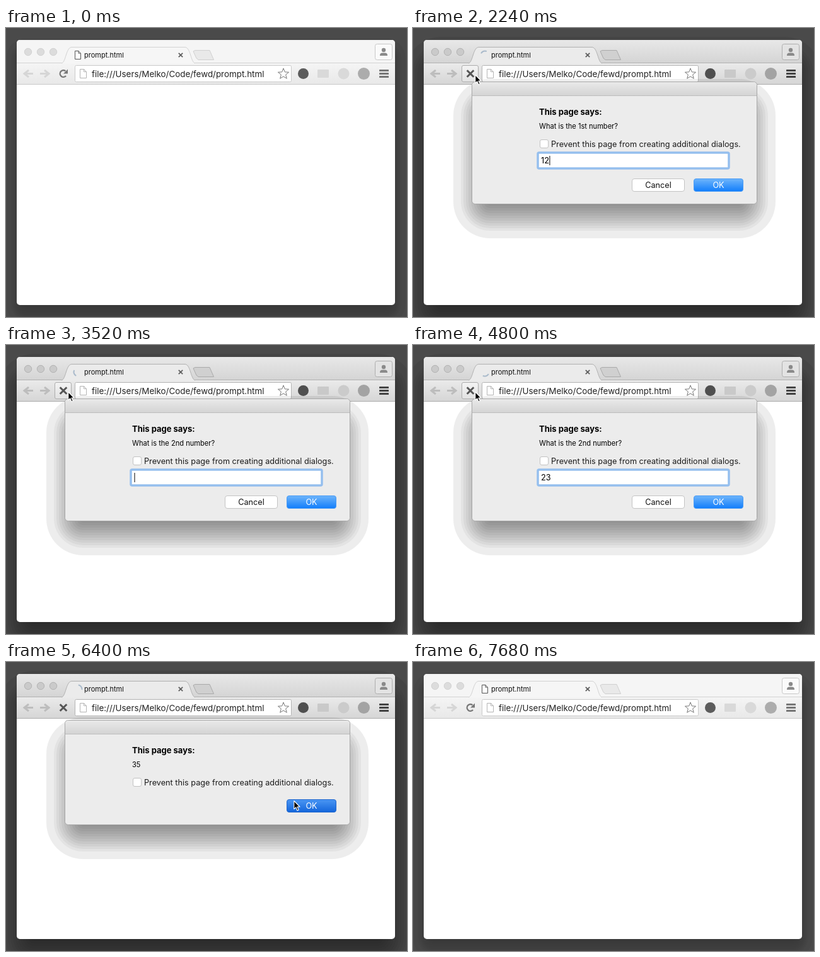
These frames come from a looping animation (636 px wide and 459 px high, 7.84 s). An HTML page with a canvas:

```html
<!DOCTYPE html>
<html lang="en">
<head>
<meta charset="utf-8">
<title>prompt.html</title>
<style>
html, body { margin: 0; width: 100%; height: 100%; overflow: hidden; background: #4a4a4a; }
canvas { display: block; width: 636px; height: 459px; }
</style>
</head>
<body>
<canvas id="stage" width="636" height="459"></canvas>
<script>
const W = 636, H = 459, LOOP = 7840, STEP = 160;
const FONT = 'Inter, "Open Sans", sans-serif';
const stage = document.getElementById('stage').getContext('2d');
const layer = document.createElement('canvas');
layer.width = W;
layer.height = H;
const sheet = layer.getContext('2d');
let g = stage;

const PROMPT = { y: 86, h: 193 }, ALERT = { y: 93, h: 165 };
const DIALOGS = [
  { from: 1182, to: 2880, box: PROMPT, text: 'What is the 1st number?', keys: '12', typeAt: 1920 },
  { from: 3010, to: 4860, box: PROMPT, text: 'What is the 2nd number?', keys: '23', typeAt: 3840 },
  { from: 4860, to: 6560, box: ALERT, text: '35' }
];
const POINTER = [
  [160, 406, 419], [320, 372, 380], [800, 98, 74], [5600, 98, 74],
  [6080, 456, 220], [6720, 456, 220], [7040, 406, 419], [7680, 406, 419]
];

function vertical(y, h, top, bottom) {
  const grad = g.createLinearGradient(0, y, 0, y + h);
  grad.addColorStop(0, top);
  grad.addColorStop(1, bottom);
  return grad;
}

function paint(fill, stroke, width = 1) {
  if (fill) { g.fillStyle = fill; g.fill(); }
  if (stroke) { g.strokeStyle = stroke; g.lineWidth = width; g.stroke(); }
}

function box(x, y, w, h, r, fill, stroke, width) {
  g.beginPath();
  g.roundRect(x, y, w, h, r);
  paint(fill, stroke, width);
}

function disc(x, y, r, fill, stroke, width) {
  g.beginPath();
  g.arc(x, y, r, 0, 7);
  paint(fill, stroke, width);
}

function poly(points, fill, stroke, width, open) {
  g.beginPath();
  points.forEach(([x, y]) => g.lineTo(x, y));
  if (!open) g.closePath();
  paint(fill, stroke, width);
}

function label(str, x, y, size, color, weight = 400, align = 'left') {
  g.font = `${weight} ${size}px ${FONT}`;
  g.textAlign = align;
  g.fillStyle = color;
  g.fillText(str, x, y);
}

function cross(x, y, r, width, color) {
  poly([[x - r, y - r], [x + r, y + r]], null, color, width, true);
  poly([[x + r, y - r], [x - r, y + r]], null, color, width, true);
}

// Stepped window shadow; k sets its reach, outer is the faint first ring.
function shadow(x, y, w, h, k, outer, first) {
  const ring = (d, alpha) => {
    const e = d * k;
    box(x - e, y + 25 * k - e, w + 2 * e, h + 2 * e, Math.max(6, (28 + d) * k), `rgba(0,0,0,${alpha})`);
  };
  ring(outer, first);
  for (let d = 18; d > -28; d -= 4) ring(Math.min(d, outer), 0.045 * k);
}

function pageIcon(x, y, w, h, color) {
  const f = w * 0.4;
  poly([[x, y], [x + w - f, y], [x + w, y + f], [x + w, y + h], [x, y + h]], '#fff', color);
  poly([[x + w - f, y], [x + w - f, y + f], [x + w, y + f]], null, color, 1, true);
}

function arrow(x, y, dir, color) {
  poly([[x - 7 * dir, y], [x + 8 * dir, y]], null, color, 3, true);
  poly([[x + dir, y - 5.5], [x - 6 * dir, y], [x + dir, y + 5.5]], null, color, 3, true);
}

function star(x, y, r) {
  const points = [];
  for (let i = 0; i < 10; i++) {
    const a = i * Math.PI / 5 - Math.PI / 2, q = i % 2 ? r * 0.43 : r;
    points.push([x + q * Math.cos(a), y + q * Math.sin(a)]);
  }
  poly(points, '#fff', '#777');
}

function reload(x, y, color) {
  g.beginPath();
  g.arc(x, y, 5.3, 0.7, 5.4);
  paint(null, color, 2.4);
  poly([[x + 7, y - 7], [x + 7, y], [x, y]], color);
}

function spinner(t) {
  const mid = (45 - 11 * (t - 1280) / STEP - 90) * Math.PI / 180;
  g.beginPath();
  g.arc(114, 43, 6.5, mid - 0.8, mid + 0.8);
  paint(null, '#a9bacb', 2);
}

function browser(t, active, modal, loading, hover) {
  const line = active ? '#b1b1b1' : '#d2d2d2';
  g.fillStyle = '#4a4a4a';
  g.fillRect(0, 0, W, H);
  shadow(17, 19, 600, 421, active ? 1 : 0.55, 30, active ? 0.07 : 0.04);

  g.save();
  g.beginPath();
  g.roundRect(17, 19, 600, 421, 5);
  g.clip();
  g.fillStyle = '#fff';
  g.fillRect(17, 19, 600, 421);
  g.fillStyle = active ? vertical(19, 37, '#e8e8e8', '#d4d4d4') : '#f5f5f5';
  g.fillRect(17, 19, 600, 37);
  g.fillStyle = active ? vertical(55, 35, '#ebebeb', '#d5d5d5') : vertical(55, 35, '#f5f5f5', '#e8e8e8');
  g.fillRect(17, 56, 600, 34);
  g.fillStyle = line;
  g.fillRect(17, 55, 600, 1);
  g.fillStyle = active ? '#adadad' : '#c9c9c9';
  g.fillRect(17, 89, 600, 1);
  g.restore();

  const lights = ['#fc5b57', '#fdbc40', '#34c84a'];
  lights.forEach((color, i) => {
    const fill = !active ? '#dcdcdc' : modal ? '#cacaca' : color;
    const rim = !active ? '#d2d2d2' : modal ? '#b3b3b3' : 'rgba(0,0,0,.15)';
    disc(35 + 20 * i, 38, 5.7, fill, rim);
  });

  g.beginPath();
  g.moveTo(88, 56);
  g.bezierCurveTo(95, 55, 95, 31, 104, 30.5);
  g.lineTo(284, 30.5);
  g.bezierCurveTo(293, 31, 293, 55, 300, 56);
  paint(active ? '#ebebeb' : '#f6f6f6', line);
  poly([[300, 35.5], [323, 35.5], [329.5, 50.5], [305, 50.5], [302, 48], [297, 37]],
    active ? '#d0d0d0' : '#e9e9e9', active ? '#aaa' : '#d0d0d0');
  if (loading) spinner(t);
  else pageIcon(109.5, 36.5, 9, 13, '#555');
  label('prompt.html', 124, 47, 11, '#111');
  cross(277, 43, 3.2, 1.7, '#5c5c5c');

  box(585.5, 25.5, 27, 25, 3, active ? '#e3e3e3' : '#fafafa', active ? '#aeaeae' : '#c8c8c8');
  disc(599, 35, 3.2, '#8a8a8a');
  box(593, 39.5, 12, 4.5, [4, 4, 0, 0], '#8a8a8a');

  const faint = active ? '#bdbdbd' : '#d6d6d6', dark = active ? '#555' : '#777';
  arrow(35, 72.5, 1, faint);
  arrow(62, 72.5, -1, faint);
  if (hover) box(77.5, 59.5, 26, 26, 2.5, vertical(59, 26, '#f4f4f4', '#e2e2e2'), '#adadad');
  if (loading) cross(91, 72.5, 5.3, 3, dark);
  else reload(91, 72.5, dark);

  box(109.5, 59.5, 343, 26, 2, '#fff', active ? '#b4b4b4' : '#cacaca');
  pageIcon(117.5, 65.5, 10, 14, '#b4b4b4');
  label('file:///Users/Melko/Code/fewd/prompt.html', 136, 78, 13.4, '#222');
  star(440, 73, 9);

  disc(471.5, 72.5, 8.5, active ? '#4f4f4f' : '#5c5c5c');
  box(494, 66, 18, 13, 1, active ? '#c9c9c9' : '#d9d9d9');
  disc(535.5, 72.5, 9, active ? '#cbcbcb' : '#d9d9d9');
  disc(567.5, 72.5, 9.5, active ? '#a3a3a3' : '#acacac');
  for (let y = 66; y < 78; y += 5) box(592, y, 15, 3, 0.5, active ? '#444' : '#777');
}

function button(x, y, w, str, fill, rim, color) {
  box(x + 0.5, y + 0.5, w - 1, 20, 3.5, fill, rim);
  label(str, x + w / 2, y + 15, 12.7, color, 400, 'center');
}

function drawDialog(d, t, open, pressed) {
  const x = 94, w = 451, { y, h } = d.box;
  shadow(x, y, w, h, 1, 5 + 25 * open, 0.07 / open);
  box(x - 0.5, y - 0.5, w + 1, h + 1, 5, '#ececec', '#a8a8a8');
  box(x, y, w, 22, [5, 5, 0, 0], vertical(y, 22, '#e9e9e9', '#d3d3d3'));
  g.fillStyle = '#bdbdbd';
  g.fillRect(x, y + 21, w, 1);

  label('This page says:', x + 106, y + 52, 13, '#000', 700);
  label(d.text, x + 106, y + 74, 11.1, '#000');
  box(x + 107.5, y + 91.5, 13, 13, 2.5, '#fff', '#c2c2c2');
  label('Prevent this page from creating additional dialogs.', x + 125, y + 103, 12.7, '#1c1c1c');

  const by = y + h - 40;
  const blue = pressed ? ['#4b97f4', '#1264da'] : ['#70b6fb', '#0f7cfb'];
  if (d.keys) {
    const typed = d.keys.slice(0, Math.max(0, 1 + Math.floor((t - d.typeAt) / 320)));
    box(x + 104, y + 112, 303, 25, 2, '#fff', '#95bfee', 3.5);
    label(typed, x + 109, y + 129, 12.7, '#000');
    if (Math.floor((t - 1280) / 480) % 2 === 0) {
      g.fillRect(x + 109.5 + g.measureText(typed).width, y + 117, 1, 15);
    }
    button(x + 253, by, 84, 'Cancel', '#fff', '#c4c4c4', '#111');
  }
  button(x + 351, by, 79, 'OK', vertical(by, 21, ...blue), pressed ? '#2268cd' : '#4a9bf5', '#fff');
}

function showDialog(d, t, pressed) {
  const p = Math.min(1, (t - d.from) / 200);
  const scale = 0.2 + 0.8 * p, open = 0.1 + 0.9 * p;
  const cx = 319.5, cy = d.box.y + d.box.h / 2;
  g = sheet;
  g.clearRect(0, 0, W, H);
  drawDialog(d, t, open, pressed);
  g = stage;
  g.save();
  g.globalAlpha = open;
  g.imageSmoothingQuality = 'high';
  g.translate(cx, cy);
  g.scale(scale, scale);
  g.drawImage(layer, -cx, -cy);
  g.restore();
}

function pointerAt(t) {
  const i = POINTER.findIndex(p => p[0] > t);
  if (i < 1) return null;
  const [t0, x0, y0] = POINTER[i - 1], [t1, x1, y1] = POINTER[i];
  const u = (t - t0) / (t1 - t0), e = u * u * (3 - 2 * u);
  return [x0 + (x1 - x0) * e, y0 + (y1 - y0) * e];
}

function drawPointer([x, y]) {
  g.save();
  g.translate(x, y);
  g.lineJoin = 'round';
  poly([[0.8, 0.5], [0.8, 13.5], [3.8, 10.8], [6, 16], [8.2, 15], [6, 10], [10, 10]], '#000', '#fff', 1.1);
  g.restore();
}

function render(t) {
  const active = t >= 160 && t < 7680;
  const modal = t >= 1280 && t < 6560;
  const loading = t >= 1120 && t < 6560;
  const tip = pointerAt(t);
  const hover = tip && tip[0] > 77 && tip[0] < 104 && tip[1] > 59 && tip[1] < 86;
  browser(t, active, modal, loading, hover);
  const dialog = DIALOGS.find(d => t >= d.from && t < d.to);
  if (dialog) showDialog(dialog, t, t >= 6400);
  if (tip) drawPointer(tip);
}

const start = performance.now();
function tick() {
  const t = (performance.now() - start) % LOOP;
  render(Math.floor(t / STEP) * STEP);
  requestAnimationFrame(tick);
}
tick();
</script>
</body>
</html>
```
